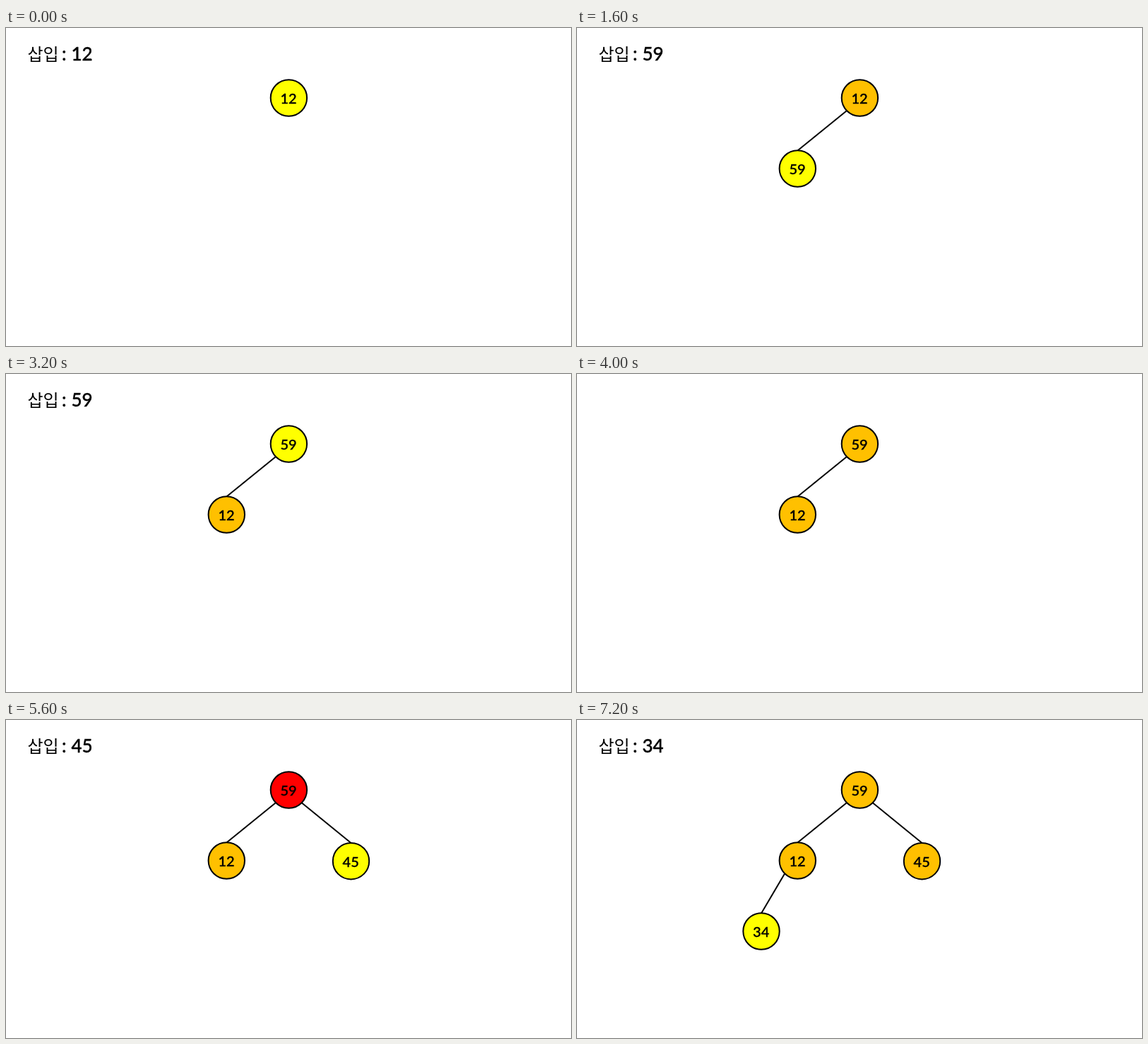
An HTML page that plays this animation: 800x450 px, repeating every 8 s.

```html
<!DOCTYPE html>
<html lang="ko">
<head>
<meta charset="utf-8">
<title>최대 힙 삽입</title>
<style>
  html, body { margin: 0; width: 100%; height: 100%; overflow: hidden; background: #fff; }
  svg { display: block; width: 800px; height: 450px; }
  circle, line { stroke: #000; stroke-width: 2; }
  text { font: 500 20px Lato, sans-serif; stroke: #000; stroke-width: .35px; }
  .value { text-anchor: middle; }
  .title text { font-size: 26px; }
  .title .word { font: 500 24px "Noto Sans CJK KR", "Noto Sans CJK", sans-serif; stroke: none; }
</style>
</head>
<body>
<svg viewBox="0 0 800 450"></svg>
<script>
const STEP = 800;
const COLORS = { A: '#ffc000', Y: '#ffff00', B: '#00b0f0', R: '#ff0000' };

// Heap slots: centre, and the edge up to the parent
const SLOTS = [
  { x: 400.4, y: 99 },
  { x: 312.3, y: 199, edge: [382, 117, 312.3, 173.5] },
  { x: 488.5, y: 199.7, edge: [418.5, 117, 488.5, 174] },
  { x: 261, y: 299, edge: [294.3, 217, 261, 273.5] }
];

// Each state: inserted value (or none), slot values, slot colours
const STATES = [
  [12, [12], 'Y'],
  [null, [12], 'A'],
  [59, [12, 59], 'AY'],
  [59, [12, 59], 'BY'],
  [59, [59, 12], 'YA'],
  [null, [59, 12], 'AA'],
  [45, [59, 12, 45], 'AAY'],
  [45, [59, 12, 45], 'RAY'],
  [null, [59, 12, 45], 'AAA'],
  [34, [59, 12, 45, 34], 'AAAY']
];

const svg = document.querySelector('svg');

const title = value => value === null ? '' : `<g class="title">
  <text class="word" x="30.5" y="46">삽입</text>
  <text x="79" y="46">:</text>
  <text x="92.5" y="46">${value}</text></g>`;

function node(value, i, color) {
  const { x, y, edge } = SLOTS[i];
  const line = edge
    ? `<line x1="${edge[0]}" y1="${edge[1]}" x2="${edge[2]}" y2="${edge[3]}"/>` : '';
  return `${line}<circle cx="${x}" cy="${y}" r="25.7" fill="${COLORS[color]}"/>
    <text class="value" x="${x - .3}" y="${y + 8}">${value}</text>`;
}

let shown = -1;
function draw() {
  const step = Math.floor(performance.now() / STEP) % STATES.length;
  if (step !== shown) {
    const [inserted, values, colors] = STATES[step];
    svg.innerHTML = title(inserted) + values.map((v, i) => node(v, i, colors[i])).join('');
    shown = step;
  }
  requestAnimationFrame(draw);
}
draw();
</script>
</body>
</html>
```
